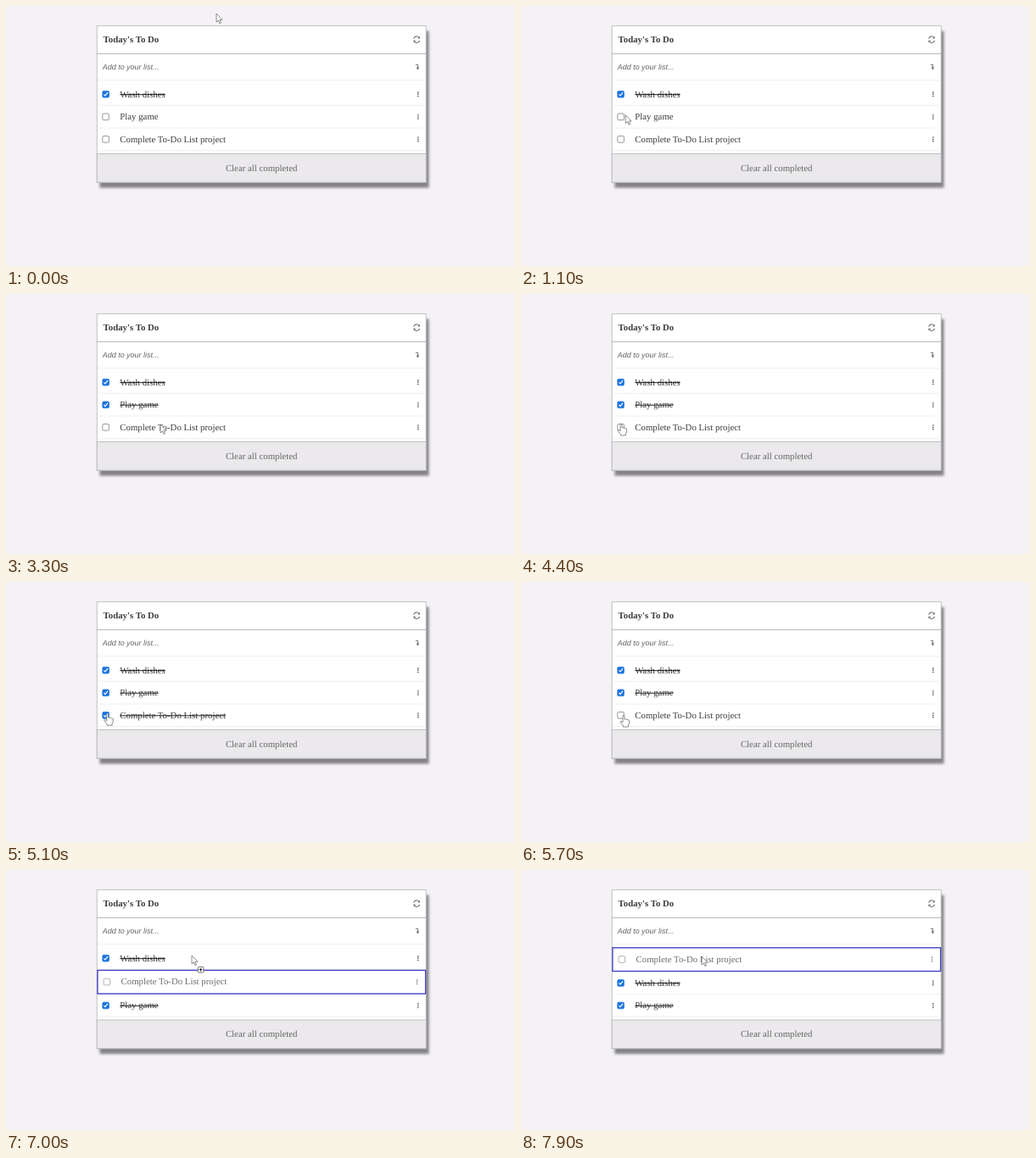
These frames come from a looping animation (600x307 px, 8000 ms). An HTML page:

```html
<!DOCTYPE html>
<html lang="en">
<head>
<meta charset="utf-8">
<title>To-do list</title>
<style>
  html, body { margin: 0; width: 100%; height: 100%; overflow: hidden; background: #f4f2f5; }
  svg { display: block; width: 100%; height: 100%; }
  text { font: 10.8px "Liberation Serif", "Times New Roman", serif; fill: #3c3c3c; text-rendering: geometricPrecision; }
  .title { font-weight: bold; }
  .hint { font: italic 8.95px "Liberation Sans", Arial, sans-serif; fill: #666; }
  .clear { fill: #666; text-anchor: middle; }
  .line { stroke: #ededee; stroke-width: .8; }
  .icon { fill: none; stroke: #777; stroke-width: 1.1; }
  .box { fill: #fff; stroke: #767676; stroke-width: .75; }
  .done .box { fill: #1a73e0; stroke: #1a73e0; }
  .tick { fill: none; stroke: #fff; stroke-width: 1.2; }
  .strike { stroke: #222; stroke-width: 1; }
  .tick, .strike, .frame { visibility: hidden; }
  .done .tick, .done .strike, .dragged .frame { visibility: visible; }
  .dragged .line { visibility: hidden; }
  .dragged .content { opacity: .75; }
  .frame { fill: none; stroke: #4343c4; stroke-width: 1.4; }
  .pointer { fill: #fff; stroke: #666; stroke-width: .75; stroke-linejoin: round; }
</style>
</head>
<body>
<svg viewBox="0 0 600 307">
  <rect id="shadow" x="110.5" y="29.6" width="388" height="185" fill="#848286" style="filter: blur(1.6px)"/>
  <rect id="card" x="107.2" y="23.3" width="388" height="185" fill="#fff" stroke="#b3b2b4" stroke-width=".8"/>
  <path d="M107 56.3H495" stroke="#aaa" stroke-width=".9"/>
  <path d="M107.6 87.5H494.8" class="line"/>
  <text x="114.6" y="43.4" class="title">Today's To Do</text>
  <text x="113.8" y="75" class="hint">Add to your list...</text>
  <g class="icon">
    <path d="M480.6 38.6A3.5 3.5 0 0 1 487 37.5M487.6 40.6A3.5 3.5 0 0 1 481.2 41.7"/>
    <path d="M487.8 35.6V38.6H484.8ZM480.4 43.6V40.6H483.4Z" fill="#777" stroke="none"/>
    <path d="M482.8 69.3H485.4V73"/>
    <path d="M483.4 72.6H487.4L485.4 75.4Z" fill="#777" stroke="none"/>
  </g>
  <g id="rows"></g>
  <g id="footer">
    <rect x="107.2" y="174.5" width="388" height="33.7" fill="#ebe9ec" stroke="#b3b2b4" stroke-width=".8"/>
    <text x="301.2" y="194.8" class="clear">Clear all completed</text>
  </g>
  <g id="cursor">
    <path id="arrow" class="pointer" d="M0 0V10L2.3 7.9 3.9 11.6 5.5 10.9 3.9 7.3H7Z"/>
    <path id="hand" class="pointer" d="M-1 1Q0-.6 1 1V5Q2.1 4.2 2.9 5.3 4 4.6 4.8 5.8 6.2 5.2 6.6 6.6V10L5.4 12V14H-.6V12.6L-4 8.4Q-3.6 6.6-2 7.8L-1 8.8Z"/>
    <g id="plus">
      <rect x="7.3" y="13.5" width="6.6" height="6.6" rx="1" fill="#fff" stroke="#555" stroke-width=".8"/>
      <path d="M8.8 16.8H12.4M10.6 15V18.6" stroke="#222" stroke-width="1.1"/>
    </g>
  </g>
</svg>
<script>
const LOOP = 8000, STEP = 100;
const CARD_HEIGHT = 185, LIST_TOP = 90.8, ROW = 26.6, FRAME_EXTRA = 2.6, TEXT_X = 134.3;
const CHECK_GAME = 1600, CHECK_PROJECT = 4700, UNCHECK_PROJECT = 5500;
const DRAG_START = 6900, PASS_GAME = 7000, PASS_DISHES = 7100, DROP = 7900;

const move = (start, end, x, y) => ({ start, end, x, y });
const moves = [
  move(0, 0, 248, 9),
  move(300, 500, 148, 115),       // enter the card
  move(600, 1300, 117, 132),      // second checkbox
  move(1500, 2100, 233, 133),
  move(2300, 3000, 182, 154),
  move(3600, 4200, 118, 153),     // third checkbox
  move(4400, 5700, 121, 157),
  move(6100, 6800, 212, 154),     // pick up the third row
  move(6800, 7000, 219, 101),
  move(7000, 7700, 207, 92),
  move(7800, 7900, 213, 102)
];

const items = ["Wash dishes", "Play game", "Complete To-Do List project"];
const byId = id => document.getElementById(id);
const show = (id, on) => byId(id).style.display = on ? "" : "none";
const place = (node, x, y) => node.setAttribute("transform", `translate(${x} ${y})`);

byId("rows").innerHTML = items.map(label => `
  <g>
    <path class="line" d="M107.6 ${ROW}H494.8"/>
    <rect class="frame" x="107.9" y="1" width="386.7" height="${ROW + FRAME_EXTRA - 1.5}"/>
    <g class="content">
      <rect class="box" x="113.8" y="9.6" width="7.6" height="7.6" rx="1.3"/>
      <path class="tick" d="M115.4 13.5L117 15.1 120 11.3"/>
      <text x="${TEXT_X}" y="16.8">${label}</text>
      <path class="strike"/>
      <g class="dots" fill="#666">${[-1, 0, 1].map(k =>
        `<circle cx="485.8" cy="${13.4 + 2.3 * k}" r=".85"/>`).join("")}</g>
    </g>
  </g>`).join("");

const rows = [...byId("rows").children];
for (const row of rows) {
  const width = row.querySelector("text").getComputedTextLength();
  row.querySelector(".strike").setAttribute("d", `M${TEXT_X} 13.8h${width}`);
}

function pointerAt(t) {
  let x = 0, y = 0;
  for (const m of moves) {
    if (t < m.start) break;
    const k = m.end > m.start ? Math.min(1, (t - m.start) / (m.end - m.start)) : 1;
    const eased = k * k * (3 - 2 * k);
    x += (m.x - x) * eased;
    y += (m.y - y) * eased;
  }
  return [x, y];
}

function draw(now) {
  const t = Math.floor(now % LOOP / STEP) * STEP;
  const dragging = t >= DRAG_START;
  const done = [true, t >= CHECK_GAME, t >= CHECK_PROJECT && t < UNCHECK_PROJECT];
  const projectSlot = t < PASS_GAME ? 2 : t < PASS_DISHES ? 1 : 0;
  const order = [0, 1];
  order.splice(projectSlot, 0, 2);

  let top = LIST_TOP;
  for (const i of order) {
    const row = rows[i], framed = dragging && i === 2;
    const inset = framed ? FRAME_EXTRA / 2 : 0;
    row.classList.toggle("done", done[i]);
    row.classList.toggle("dragged", framed);
    place(row, 0, top);
    place(row.querySelector(".content"), inset, inset);
    place(row.querySelector(".dots"), -2 * inset, 0);
    top += ROW + 2 * inset;
  }

  const grow = dragging ? FRAME_EXTRA : 0;
  for (const id of ["card", "shadow"]) byId(id).setAttribute("height", CARD_HEIGHT + grow);
  place(byId("footer"), 0, grow);

  const [x, y] = pointerAt(t);
  const overBox = x > 112 && x < 123 && y > 120;
  place(byId("cursor"), x, y);
  show("hand", overBox);
  show("arrow", !overBox);
  show("plus", dragging && t < DROP);
}

function tick() {
  draw(performance.now());
  requestAnimationFrame(tick);
}
tick();
</script>
</body>
</html>
```
